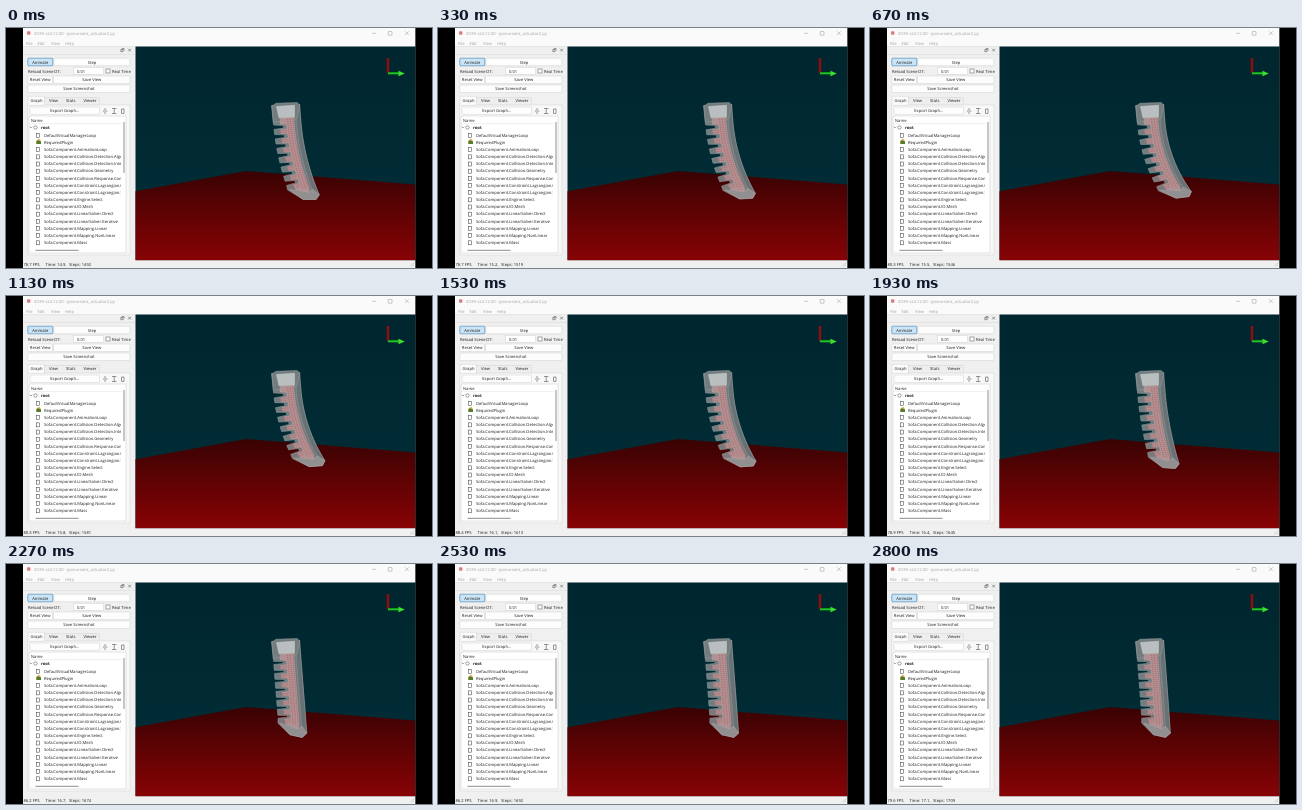
Recreate the animation shown at these times as an HTML page. Size 426x240 px, loop 2.87 s.

```html
<!DOCTYPE html>
<html lang="en">
<head>
<meta charset="utf-8">
<title>Pneumatic actuator</title>
<style>
  html, body { margin: 0; width: 100%; height: 100%; overflow: hidden; background: #000; }
  svg { display: block; width: 100vw; height: 100vh; }
  text { font: 4.13px "Open Sans", "Noto Sans", sans-serif; fill: #1c1c1c; white-space: pre; text-rendering: geometricPrecision; }
</style>
</head>
<body>
<svg id="stage" viewBox="0 0 426 240">
  <defs>
    <linearGradient id="sky" x2="0" y2="1">
      <stop offset="0" stop-color="#00262f"/><stop offset="1" stop-color="#022f38"/>
    </linearGradient>
    <linearGradient id="floor" gradientUnits="userSpaceOnUse" x1="0" y1="143" x2="0" y2="232">
      <stop offset="0" stop-color="#380203"/><stop offset=".4" stop-color="#590203"/><stop offset="1" stop-color="#870305"/>
    </linearGradient>
    <clipPath id="treeClip"><rect x="23" y="88" width="92" height="131"/></clipPath>
  </defs>
  <rect width="426" height="240" fill="#000"/>
  <rect x="17" width="392.2" height="240" fill="#f0f0f0"/>
  <rect x="17" width="392.2" height="18.5" fill="#fafafa"/>
  <g id="ui"></g>
  <g id="view">
    <rect x="129.5" y="18.5" width="279.7" height="214" fill="url(#sky)"/>
    <path d="M129.5 163.3L240 143L409.2 156.5V232.5H129.5Z" fill="url(#floor)"/>
    <g fill="none">
      <path d="M382 30V45" stroke="#8f0c10" stroke-width="2.4"/>
      <path d="M382 45.3H394" stroke="#1fc51f" stroke-width="2"/>
      <path d="M392.5 42.7L398.7 45.5L392.5 48.2Z" fill="#35e32c"/>
    </g>
    <g id="robot" stroke-linejoin="round"></g>
  </g>
  <g id="status"></g>
</svg>
<script>
const SVG = "http://www.w3.org/2000/svg";
const LOOP = 2870, TICK = 200 / 3, LAST_TICK = 42;
const byId = id => document.getElementById(id);

function add(parent, tag, attrs, content) {
  const el = document.createElementNS(SVG, tag);
  for (const name in attrs) el.setAttribute(name, attrs[name]);
  if (content) el.textContent = content;
  return parent.appendChild(el);
}

const ui = byId("ui");
const label = (x, y, content, attrs = {}, parent = ui) => add(parent, "text", { x, y, ...attrs }, content);
const box = (x, y, width, height, fill = "#fdfdfd", stroke = "#cfcfcf", parent = ui) =>
  add(parent, "rect", { x, y, width, height, fill, stroke, "stroke-width": .5 });
const line = (d, stroke = "#555", width = .6, parent = ui) =>
  add(parent, "path", { d, fill: "none", stroke, "stroke-width": width });

function button(x, y, width, content, active) {
  box(x, y, width, 7.6, active ? "#cbe3f5" : "#fdfdfd", active ? "#176da9" : "#cfcfcf").setAttribute("rx", .8);
  label(x + width / 2, y + 5.4, content, { "text-anchor": "middle" });
}

function buildWindow() {
  add(ui, "circle", { cx: 22.7, cy: 5, r: 1.9, fill: "#d8808a" });
  const faded = { style: "fill:#a2a2a2" };
  label(28, 6.7, "SOFA v24.12.00 - (pneumatic_actuator2.py", faded);
  line("M366 5.3H370M399 3.3L402.8 7.1M402.8 3.3L399 7.1M382.3 3.5H386V7.2H382.3Z", "#aaa");
  [["File", 20], ["Edit", 31.5], ["View", 45], ["Help", 59]].forEach(([s, x]) => label(x, 16.5, s, faded));
  line("M17 18.6H129M17 26.5H129", "#d5d5d5", .5);
  line("M114.8 21.5H117V23.7H114.8ZM115.8 20.5H118V22.7M122.2 20.7L125 23.5M125 20.7L122.2 23.5");

  button(21.8, 30.2, 25, "Animate", true);
  button(48, 30.2, 76, "Step");
  label(22, 44.5, "Reload Scene");
  label(48.3, 44.5, "DT:");
  box(67.5, 39.4, 30, 6.9, "#fff");
  label(71, 44.5, "0.01");
  box(100, 41, 4, 4, "#fff", "#555");
  label(106, 44.5, "Real Time");
  button(21.8, 48, 24.7, "Reset View");
  button(47.5, 48, 76.5, "Save View");
  button(21.8, 57, 102.2, "Save Screenshot");

  box(21.8, 77, 102.2, 150, "#f8f8f8", "#d4d4d4");
  box(22, 68.2, 16.5, 9, "#fbfbfb", "#d4d4d4");
  box(38.5, 69.3, 55, 7.6, "#eeeeee", "#d4d4d4");
  [["Graph", 24.5], ["View", 43], ["Stats", 60], ["Viewer", 77.5]].forEach(([s, x]) => label(x, 74.3, s));
  button(24, 79, 69.5, "Export Graph...");
  line("M96.8 83H101.4M99 80V82M99 84V86M106 80.5H110.4M106 85.5H110.4M108.2 80.5V85.5M115.5 81H118V85.4H115.5Z");
  buildTree();
}

function buildTree() {
  box(23, 88, 97, 137, "#fff", "#c9c9c9");
  label(25, 93.7, "Name");
  line("M23 95.6H116", "#dedede", .5);
  const tree = add(ui, "g", { "clip-path": "url(#treeClip)" });
  line("M23.8 98.7L25 99.9L26.2 98.7", "#555", .6, tree);
  add(tree, "circle", { cx: 29.5, cy: 99.5, r: 1.7, fill: "#fff", stroke: "#666", "stroke-width": .6 });
  label(35, 101.2, "root", { style: "font-weight:bold" }, tree);
  const components = ["AnimationLoop", "Collision.Detection.Algorithm", "Collision.Detection.Intersection",
    "Collision.Geometry", "Collision.Response.Contact", "Constraint.Lagrangian.Correction",
    "Constraint.Lagrangian.Solver", "Engine.Select", "IO.Mesh", "LinearSolver.Direct",
    "LinearSolver.Iterative", "Mapping.Linear", "Mapping.NonLinear", "Mass"];
  ["DefaultVisualManagerLoop", "RequiredPlugin", ...components.map(c => "Sofa.Component." + c)].forEach((name, i) => {
    const y = 107 + i * 7.16;
    if (i === 1) {
      add(tree, "path", { d: "M30.3 116V113L32 111.7L35 113.5V116Z", fill: "#557a28" });
      add(tree, "path", { d: "M31 112.5L33 110.7L35 112.7Z", fill: "#d9a32c" });
    } else {
      box(30.5, y - 1.6, 3.2, 4, "#fff", "#333", tree);
    }
    label(38, y + 1.6, name, {}, tree);
  });
  line("M118 94V145", "#8d8d8d", 1);
  line("M29.5 222.3H72.5", "#8d8d8d", 1);
}

buildWindow();
const status = byId("status");
box(17, 232.4, 392.2, 8, "#f0f0f0", "none", status);
const fpsText = label(17.4, 238.1, "", {}, status);
const timeText = label(39.5, 238.1, "", {}, status);
const stepText = label(63, 238.1, "", {}, status);
line("M404 238.5L408 234.5M406.5 238.5L408 237", "#aaa", .5, status);

const layer = (fill, stroke, width, opacity = 1) =>
  add(byId("robot"), "path", { fill, stroke, "stroke-width": width, opacity });
const shell = layer("#82898b", "#a3a7a8", .6, .88);
const backSide = layer("#667073", "#959c9e", .5, .8);
const topBlock = layer("#737d7f", "#979e9f", .5);
const topFace = layer("#b9bebe", "#cbcfcf", .5);
const foot = layer("#969495", "#b7b3b3", .5, .85);
const chamber = layer("#b09091", "#c4a2a2", .5);
const mesh = layer("none", "#b4585d", .7);
mesh.setAttribute("stroke-dasharray", "1.1 .9");

// Columns: tick, bend in degrees, simulation step, displayed frame rate
const keys = [
  [0, 19, 1492, 78.7], [10, 32, 1546, 80.3], [17, 28, 1581, 80.3], [23, 26.5, 1613, 88.4],
  [29, 12.5, 1645, 78.9], [34, 0, 1674, 86.2], [42, -.7, 1709, 79.6]
];

function sample(tick) {
  let i = 0;
  while (i < keys.length - 2 && tick >= keys[i + 1][0]) i++;
  const a = keys[i], b = keys[i + 1];
  const p = (tick - a[0]) / (b[0] - a[0]);
  const mix = c => a[c] + (b[c] - a[c]) * p;
  return { bend: mix(1), step: Math.round(mix(2)), fps: p >= 1 ? b[3] : a[3] };
}

// Maps distance along the back edge and depth across the body to the screen.
function bentBody(bend) {
  const rad = Math.PI / 180, fixed = 16, length = 93;
  const curl = u => bend * Math.max(0, u - fixed) / (length - fixed);
  const spine = [[293.5, 76.5]];
  for (let u = 0; u < 99; u++) {
    const angle = (4.5 + curl(u + .5)) * rad, [x, y] = spine[u];
    spine.push([x + Math.sin(angle), y + Math.cos(angle)]);
  }
  return (u, v) => {
    const i = Math.floor(u), f = u - i, a = spine[i], b = spine[i + 1];
    const angle = (2 + .55 * curl(u)) * rad;
    return [a[0] + (b[0] - a[0]) * f - v * Math.cos(angle), a[1] + (b[1] - a[1]) * f + v * Math.sin(angle)];
  };
}

const toPath = points => "M" + points.map(p => p[0].toFixed(2) + " " + p[1].toFixed(2)).join("L");

function drawRobot(bend) {
  const at = bentBody(bend);
  const place = points => toPath(points.map(([u, v]) => at(u, v)));
  const shape = (el, points) => el.setAttribute("d", place(points) + "Z");
  const along = (from, to, v) => {
    const count = Math.round(Math.abs(to - from) / 4);
    return Array.from({ length: count + 1 }, (_, i) => [from + (to - from) * i / count, v]);
  };
  const gaps = Array.from({ length: 7 }, (_, i) => 21.5 + i * 9);
  const half = 1.6 + bend * .025;

  const outline = [[0, 0], [0, 28]];
  const inner = [[13, 7], [13, 20]];
  let threads = [7.7, 10.3, 13].map(v => place(along(14, 84, v))).join("");
  for (const u of gaps) {
    outline.push([u - half, 27.5], [u - half * .6, 18], [u + half * .6, 18], [u + half, 27.5]);
    inner.push([u - 2.8, 21], [u - 2.2, 14.5], [u + 2.2, 14.5], [u + 2.8, 21]);
    threads += place([[u + 3.5, 15], [u + 3.5, 21], [u + 5.5, 21], [u + 5.5, 15]]);
  }
  outline.push([82, 28], [94, 17], [97, 5], [93, 0], ...along(89, 4, 0));
  inner.push([83, 20], [88, 9], ...along(84, 13, 7));

  shape(shell, outline);
  shape(backSide, [...along(0, 93, 0), ...along(89, 2, 4.5)]);
  topBlock.setAttribute("d", toPath([[266, 78], [270, 75.3], [291, 74.5], [294, 77], at(14, 4), at(17, 27.5)]) + "Z");
  topFace.setAttribute("d", toPath([[270.5, 78.5], [288.5, 77.3], at(12.5, 6), at(12.5, 21.5)]) + "Z");
  shape(foot, [[82, 26], [88, 9], [86, 4], [93, 0], [97, 5], [94, 17]]);
  shape(chamber, inner);
  mesh.setAttribute("d", threads);
}

function render(ms) {
  const tick = Math.min(LAST_TICK, Math.floor((ms % LOOP + 3.4) / TICK));
  const { bend, step, fps } = sample(tick);
  drawRobot(bend);
  fpsText.textContent = fps.toFixed(1) + " FPS";
  timeText.textContent = "Time: " + (step / 100).toFixed(1) + ",";
  stepText.textContent = "Steps: " + step;
}

const start = performance.now();
function loop() {
  render(performance.now() - start);
  requestAnimationFrame(loop);
}
loop();
</script>
</body>
</html>
```
